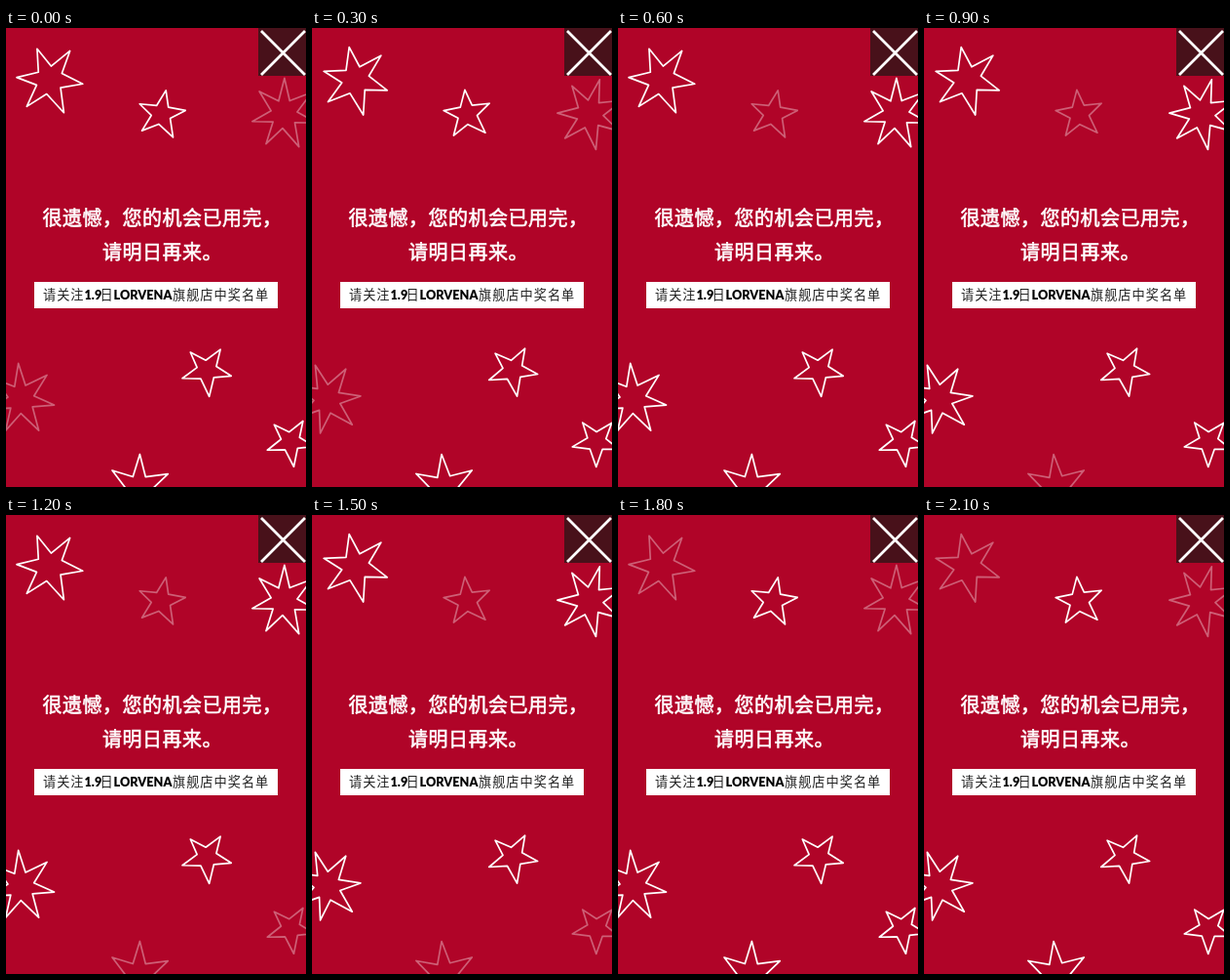
An HTML page for the animation above (2400 ms loop, 308x470 px).

```html
<!DOCTYPE html>
<html lang="zh-CN">
<head>
<meta charset="utf-8">
<title>明日再来</title>
<style>
  html, body { margin: 0; width: 308px; height: 470px; overflow: hidden; background: #b00428; }
  svg { display: block; }
  text { font-family: "Noto Sans CJK SC", "Noto Sans CJK", sans-serif; }
  .title { font-size: 20px; letter-spacing: 0.5px; fill: #fff; stroke: #fff; stroke-width: 0.6; }
  .note { font-size: 13.2px; letter-spacing: 1px; fill: #222; }
  .strong { font: 900 12.7px Lato, Inter, sans-serif; letter-spacing: 0; fill: #000; }
  #stars { fill: none; stroke: #fff; stroke-width: 1.7; stroke-linejoin: round; }
</style>
</head>
<body>
<svg width="308" height="470" viewBox="0 0 308 470">
  <rect width="308" height="470" fill="#b00428"/>
  <g id="stars"></g>
  <rect x="259" width="49" height="49" fill="#48111a"/>
  <path d="M262 3L307 48M307 3L262 48" stroke="#fff" stroke-width="2.8"/>
  <text class="title" x="37.5" y="202">很遗憾，您的机会已用完，</text>
  <text class="title" x="99" y="236.5">请明日再来。</text>
  <rect x="29" y="260" width="250" height="27" fill="#fff"/>
  <text class="note" y="278"><tspan x="38">请关注</tspan><tspan class="strong" x="80.5">1.9</tspan><tspan x="96.5">日</tspan><tspan class="strong" x="110.5">LORVENA</tspan><tspan x="171">旗舰店中奖名单</tspan></text>
</svg>
<script>
const STEP = 300, STEPS = 8;
const DIM = 0.36, NOTCH = 0.4;

// turn: resting angle, swing: added on odd steps, dim: [first step, step count]
const STARS = [
  { x: 44, y: 53, r: 35, tips: 6, turn: 7, swing: 11, dim: [6, 2] },
  { x: 159, y: 88, r: 25.5, tips: 5, turn: -8, swing: -17, dim: [2, 4] },
  { x: 285, y: 88, r: 35, tips: 7, turn: 15, swing: 15, dim: [6, 4] },
  { x: 206, y: 350, r: 26, tips: 5, turn: 14, swing: -4, dim: [0, 0] },
  { x: 15, y: 380, r: 35, tips: 7, turn: 10, swing: -15, dim: [0, 2] },
  { x: 136, y: 472, r: 34, tips: 6, turn: -27, swing: -7, dim: [3, 3] },
  { x: 292, y: 423, r: 25, tips: 5, turn: 12, swing: 8, dim: [4, 2] }
];

// Alternates tips and notches, with a slight hand-drawn wobble.
function starPath({ r, tips }) {
  const points = Array.from({ length: tips * 2 }, (_, i) => {
    const angle = Math.PI * i / tips + 0.05 * Math.sin(i * 5);
    const reach = r * (i % 2 ? NOTCH : 1) * (1 + 0.06 * Math.sin(i * 7));
    return [reach * Math.cos(angle), reach * Math.sin(angle)].map(v => v.toFixed(2));
  });
  return "M" + points.join("L") + "Z";
}

const layer = document.getElementById("stars");
const nodes = STARS.map(star => {
  const node = document.createElementNS(layer.namespaceURI, "path");
  node.setAttribute("d", starPath(star));
  return layer.appendChild(node);
});

function draw(time) {
  const step = Math.floor(time / STEP) % STEPS;
  STARS.forEach(({ x, y, turn, swing, dim: [first, count] }, i) => {
    const faded = (step - first + STEPS) % STEPS < count;
    const angle = turn + swing * (step % 2);
    nodes[i].setAttribute("transform", `translate(${x} ${y}) rotate(${angle})`);
    nodes[i].setAttribute("opacity", faded ? DIM : 1);
  });
}

const start = performance.now();
function tick() {
  draw(performance.now() - start);
  requestAnimationFrame(tick);
}
tick();
</script>
</body>
</html>
```
